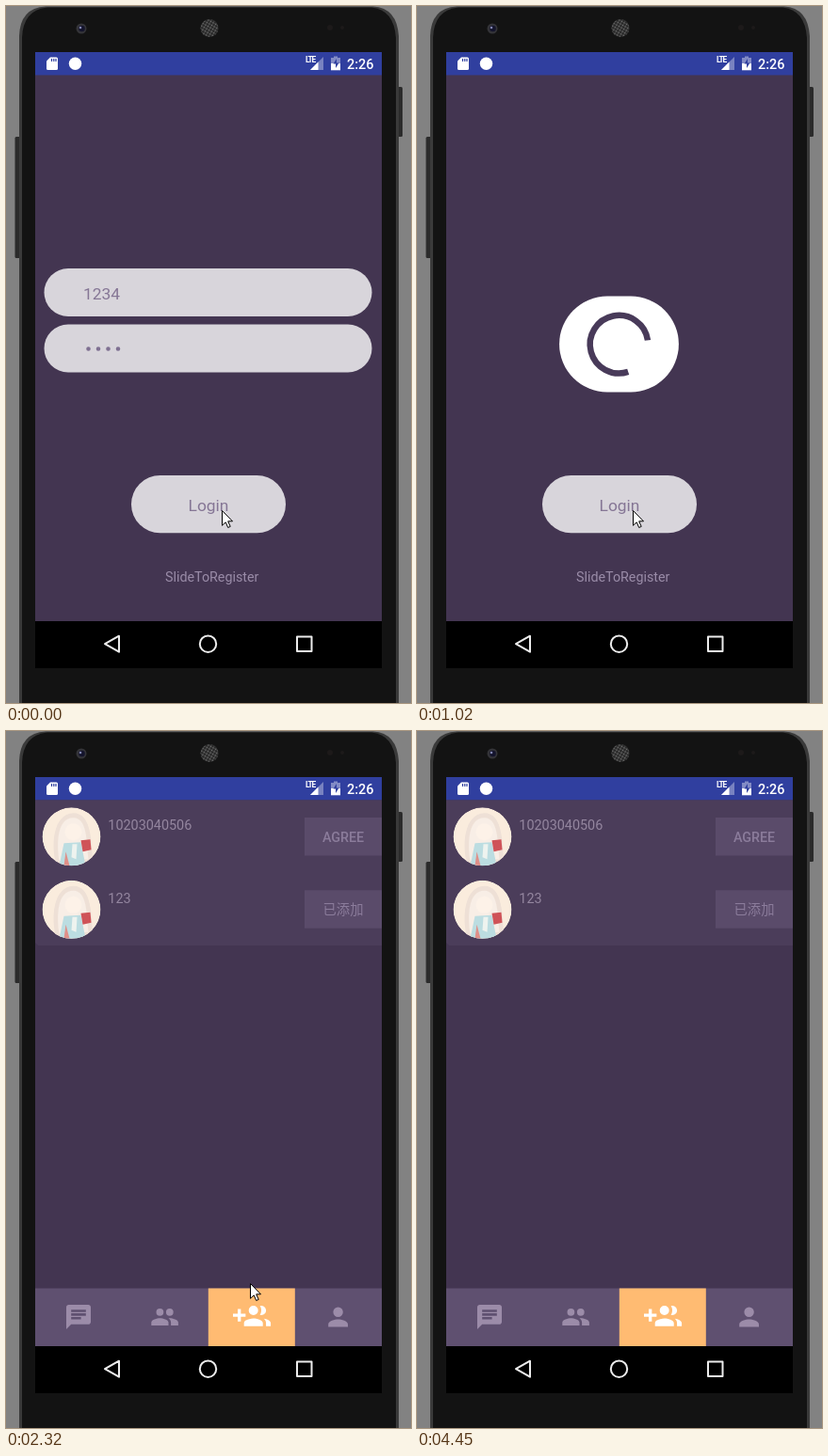
Animation of 430 by 741 pixels, one loop 6.2 s. Source, as an HTML page:

```html
<!DOCTYPE html>
<html lang="en">
<head>
<meta charset="utf-8">
<title>Login transition</title>
<style>
  html, body { margin: 0; width: 100%; height: 100%; overflow: hidden; background: #828282; }
  svg { display: block; width: 430px; height: 741px; }
  text { font-family: Roboto, "Noto Sans CJK SC", "Noto Sans CJK", sans-serif; font-size: 14.4px; }
  .mid { text-anchor: middle; }
  .label { fill: #8b7c9b; font-weight: 500; font-size: 14.3px; }
  .field { fill: #d8d5db; }
  .input { fill: #857695; font-size: 17.4px; }
  .line { fill: none; stroke: #ececec; stroke-width: 2; stroke-linejoin: round; }
  .icon { fill: #9c8ca9; }
</style>
</head>
<body>
<svg viewBox="0 0 430 741" xmlns="http://www.w3.org/2000/svg">
  <defs>
    <pattern id="mesh" width="3" height="3" patternUnits="userSpaceOnUse" patternTransform="rotate(30)">
      <rect width="3" height="3" fill="#222"/><circle cx="1.5" cy="1.5" r="1" fill="#707070"/>
    </pattern>
    <clipPath id="screen"><rect x="31" y="49" width="368" height="655"/></clipPath>
    <clipPath id="round"><circle r="31"/></clipPath>
    <g id="avatar" clip-path="url(#round)">
      <circle r="31" fill="#faecdd"/>
      <path d="M-16 31C-22 10-20-24 2-25C22-25 21 6 23 31Z" fill="#eee0d6"/>
      <path d="M-13 26C-16 6-15-20 2-20C17-20 16 6 18 24Z" fill="#f8eee6"/>
      <circle cx="2" cy="-5" r="9" fill="#fdf2e8"/>
      <path d="M-8 7L10 6L15 31H-13Z" fill="#bcdde1"/>
      <path d="M10 4L20 3L21 14L12 16Z" fill="#cf5358"/>
      <path d="M-6 16L-2 31H-8Z" fill="#df8f88"/>
      <path d="M1 8L6 8L5 24L0 22Z" fill="#eef3ef"/>
    </g>
  </defs>

  <!-- phone body -->
  <rect width="430" height="741" fill="#828282"/>
  <rect x="9.5" y="139" width="6" height="129" rx="1.5" fill="#2b2b2b"/>
  <rect x="415" y="86" width="6" height="53" rx="1.5" fill="#2b2b2b"/>
  <path d="M14 745V32Q15 2 42 .5H390Q415 2 417 32V745Z" fill="#3a3a3a"/>
  <path d="M17 745V34Q18 4 44 1.5H388Q412 4 414 34V745Z" fill="#131313"/>
  <circle cx="80" cy="24" r="5.5" fill="#343438"/>
  <circle cx="80.500" cy="24" r="3.300" fill="#14142c"/>
  <circle cx="79" cy="23" r="1.300" fill="#8084b0"/>
  <circle cx="216" cy="23.500" r="9.500" fill="url(#mesh)"/>
  <circle cx="344" cy="23" r="3" fill="#1d1a1a"/>
  <circle cx="357" cy="23" r="2" fill="#1d1a1a"/>

  <!-- login screen -->
  <rect x="31" y="49" width="368" height="655"/>
  <rect x="31" y="49" width="368" height="25" fill="#303f9f"/>
  <g id="login">
    <rect x="31" y="73.500" width="368" height="580.500" fill="#433551"/>
    <g id="inputs">
      <rect class="field" x="40.500" y="279" width="348" height="51" rx="25.500"/>
      <rect class="field" x="40.500" y="338.500" width="348" height="51" rx="25.500"/>
      <text class="input" x="82" y="312">1234</text>
      <path d="M87.500 364.500h32" stroke="#7f7092" stroke-width="4.600" stroke-linecap="round" stroke-dasharray="0 10.500"/>
      <rect id="caret" x="123.500" y="353" width="2" height="23" fill="#ff4081"/>
    </g>
    <g id="progress">
      <rect id="card" y="308.500" height="102" rx="51" fill="#fff"/>
      <path id="arc" fill="none" stroke="#483a59" stroke-width="6.500"/>
    </g>
    <rect class="field" x="133" y="499" width="164" height="61.300" rx="30.650"/>
    <text class="input mid" x="215" y="536.500">Login</text>
    <text class="mid" x="218.700" y="612.300" fill="#9a8ca8" style="font-size:14.3px">SlideToRegister</text>
  </g>

  <!-- contacts screen -->
  <g clip-path="url(#screen)"><g id="contacts">
    <rect x="31" y="49" width="368" height="25" fill="#303f9f"/>
    <rect x="31" y="73.500" width="368" height="580.500" fill="#433551"/>
    <path d="M31 73.500H399V228H34L31 225Z" fill="#4b3d5a"/>
    <use href="#avatar" x="69.500" y="112.300"/>
    <use href="#avatar" x="69.500" y="189.800"/>
    <g fill="#94869f">
      <text x="108.300" y="105">10203040506</text>
      <text x="108.300" y="182.500">123</text>
    </g>
    <path d="M317 92h82v40.500h-82zM317 169.300h82v40.500h-82z" fill="#5a4b6a"/>
    <text class="label mid" x="358" y="117.500">AGREE</text>
    <text class="label mid" x="358" y="195.200" style="font-weight:400">已添加</text>
    <rect x="31" y="592.500" width="368" height="61.500" fill="#5f5070"/>
    <rect x="214.800" y="592.500" width="92" height="61.500" fill="#ffbb72"/>
    <path class="icon" transform="translate(61.4 607.4) scale(1.3)" d="M20 2H4c-1.100 0-2 .9-2 2V22l4-4h14c1.100 0 2-.9 2-2V4c0-1.100-.9-2-2-2zM6 9h12v2H6zM14 14H6v-2h8zM18 8H6V6h12z"/>
    <path class="icon" transform="translate(153 607.4) scale(1.3)" d="M16 11a3 3 0 1 0-3-3 3 3 0 0 0 3 3zM8 11a3 3 0 1 0-3-3 3 3 0 0 0 3 3zM8 13c-2.300 0-7 1.200-7 3.500V19h14v-2.500C15 14.200 10.300 13 8 13zM16 13l-1 .05c1.200.85 2 2 2 3.450V19h6v-2.500C23 14.200 18.300 13 16 13z"/>
    <path fill="#fff" transform="translate(241 602.7) scale(1.67)" d="M8 10H5V7H3v3H0v2h3v3h2v-3h3zM18 11a3 3 0 1 0-.9-5.860c1.200 1.700 1.200 4 0 5.720zM13 11a3 3 0 1 0-3-3 3 3 0 0 0 3 3zM19.600 13.200c.8.700 1.400 1.600 1.400 2.800v2h3v-2c0-1.500-2.400-2.500-4.400-2.800zM13 13c-2 0-6 1-6 3v2h12v-2c0-2-4-3-6-3z"/>
    <path class="icon" transform="translate(337 607.4) scale(1.3)" d="M12 12a4 4 0 1 0-4-4 4 4 0 0 0 4 4zM12 14c-2.700 0-8 1.300-8 4v2h16v-2c0-2.700-5.300-4-8-4z"/>
  </g></g>

  <!-- system bars -->
  <g fill="#fff">
    <path d="M47 54.500h6.500q1.500 0 1.500 1.500v10.500q0 1.500-1.500 1.500h-9q-1.500 0-1.500-1.500V58.500z"/>
    <path d="M48.500 56v3M50.800 56v3M53 56v3" stroke="#303f9f" stroke-width="1.200"/>
    <circle cx="73.500" cy="61.300" r="6.700"/>
    <path d="M337 54V68H323Z" opacity=".35"/>
    <path d="M331.500 59.500V68H323Z"/>
    <text x="318" y="60.300" style="font-size:8.4px;font-weight:700;letter-spacing:-1.2px">LTE</text>
    <path d="M348 53.500h4V55h3v6h-10V55h3z" opacity=".4"/>
    <path d="M345 61h10v7.300h-10z"/>
    <path d="M351 56l-3.500 5.500h2.500V66l3.500-5.500H351z" fill="#303f9f"/>
    <text x="362" y="66.700" style="font-weight:500">2:26</text>
  </g>
  <path class="line" d="M105 678.200L120 669.700V686.700Z"/>
  <circle class="line" cx="214.500" cy="678.200" r="8.700"/>
  <rect class="line" x="309" y="670.500" width="15.500" height="15.500"/>

  <path id="cursor" d="M.5.5V16.300L4.200 12.800L6.700 18.500L9.200 17.400L6.700 11.800H11.500Z" fill="#fff" stroke="#000"/>
</svg>
<script>
const LOOP = 6200;
const FIELDS_HIDE = 370, WINDOW_START = 1491;
const WINDOW_STEPS = [1540, 1600, 1650, 1680, 1710];
const $ = id => document.getElementById(id);
const clamp = x => Math.min(1, Math.max(0, x));
const show = (id, on) => $(id).setAttribute("display", on ? "inline" : "none");

// Cursor moves: start, end, number of steps, way points.
const MOVES = [
  [0, 1, 1, [[229, 536]]],
  [2040, 2100, 2, [[241, 556], [253, 576]]],
  [2320, 2650, 7, [[259, 587], [273, 612], [262, 655], [205, 690], [150, 704], [115, 706], [98, 706]]],
  [2830, 2970, 5, [[99, 705], [105, 700]]],
  [3590, 4190, 12, [[110, 696], [122, 689], [165, 700], [212, 716], [230, 730], [205, 738], [170, 725], [149, 708]]],
  [4250, 4390, 3, [[148, 701], [149, 711]]],
];
const CURSOR_GONE = 4450;

function along(points, p) {
  const s = p * (points.length - 1), i = Math.floor(s);
  const a = points[i], b = points[i + 1] || a;
  return a.map((v, k) => v + (b[k] - v) * (s - i));
}

function cursorAt(t) {
  const [start, end, steps, points] = MOVES.filter(m => m[0] <= t).pop();
  const gaps = Math.max(1, steps - 1);
  return along(points, Math.floor(clamp((t - start) / (end - start)) * gaps) / gaps);
}

// cubic-bezier(.4, 0, .2, 1)
function fastOutSlowIn(x) {
  let lo = 0, hi = 1;
  for (let i = 0; i < 20; i++) {
    const u = (lo + hi) / 2, v = 1 - u;
    if (1.2 * v * v * u + 0.6 * v * u * u + u * u * u < x) lo = u; else hi = u;
  }
  return lo * lo * (3 - 2 * lo);
}

function arcPath(from, to) {
  const point = deg => {
    const a = deg * Math.PI / 180;
    return `${214.5 + 30.8 * Math.cos(a)} ${359.7 + 30.8 * Math.sin(a)}`;
  };
  return `M${point(from)}A30.8 30.8 0 ${to - from > 180 ? 1 : 0} 1 ${point(to)}`;
}

function drawProgress(t) {
  const width = 102 + 130 * (1 - clamp((t - FIELDS_HIDE) / 1156)) ** 2;
  $("card").setAttribute("x", 214.5 - width / 2);
  $("card").setAttribute("width", width);
  const cycle = 1333, half = cycle / 2, local = Math.max(0, t - 320) % cycle;
  const head = 270 * fastOutSlowIn(clamp(local / half));
  const tail = 270 * fastOutSlowIn(clamp(local / half - 1));
  const turn = -37 + 0.245 * (t - 560), cap = 6;
  $("arc").setAttribute("d", arcPath(turn + tail - cap, turn + head + cap));
}

function drawWindow(t) {
  const step = WINDOW_STEPS.filter(s => s <= t).pop();
  show("contacts", step);
  show("login", step !== WINDOW_STEPS[4]);
  if (!step) return;
  const age = step - WINDOW_START;
  const shift = step === WINDOW_STEPS[4] ? 0 : 52.4 * (1 - age / 350) ** 5;
  $("contacts").setAttribute("transform", `translate(0 ${shift})`);
  $("contacts").setAttribute("opacity", 1 - (1 - clamp(age / 220)) ** 5);
}

function render(t) {
  show("caret", t >= 90);
  show("inputs", t < FIELDS_HIDE);
  show("progress", t >= FIELDS_HIDE);
  drawProgress(t);
  drawWindow(t);
  show("cursor", t < CURSOR_GONE);
  $("cursor").setAttribute("transform", `translate(${cursorAt(t).map(Math.round)})`);
}

const begin = performance.now();
function tick() {
  render((performance.now() - begin) % LOOP);
  requestAnimationFrame(tick);
}
tick();
</script>
</body>
</html>
```
